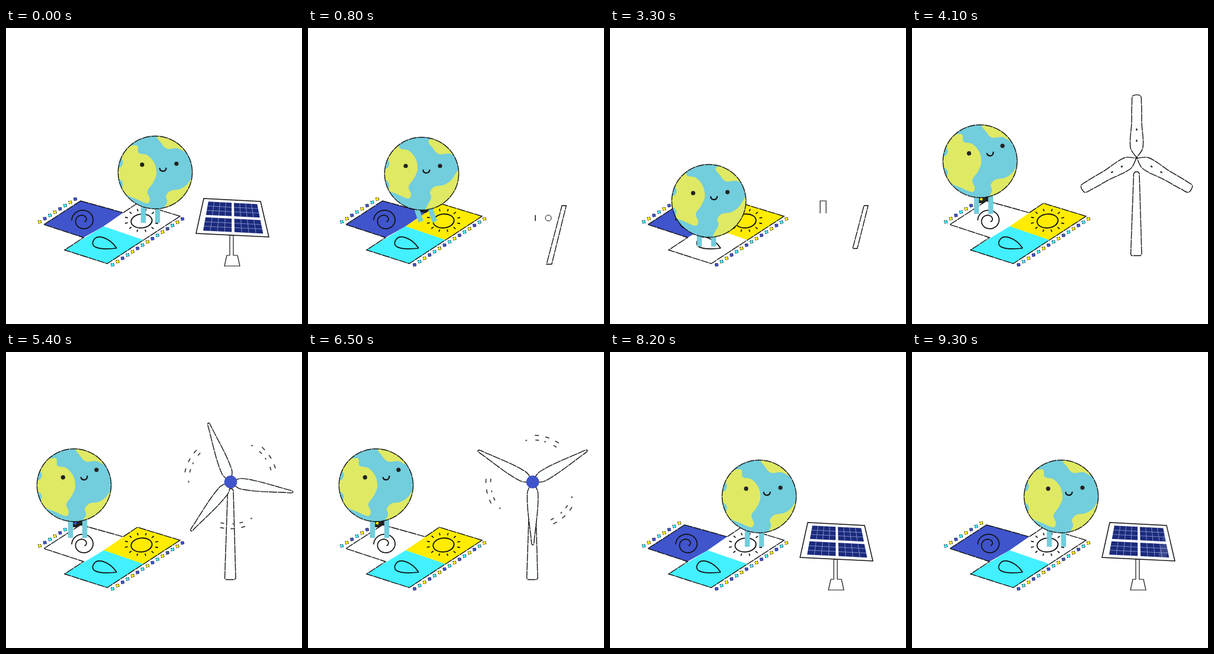
Recreate the animation shown at these times as an HTML page with a canvas. Size 500 by 500 pixels, loop 9400 ms.

```html
<!DOCTYPE html>
<html lang="en">
<head>
<meta charset="utf-8">
<title>Earth and clean energy</title>
<style>
html, body { margin: 0; width: 100%; height: 100%; overflow: hidden; background: #fff; }
canvas { display: block; width: 500px; height: 500px; }
</style>
</head>
<body>
<canvas id="stage" width="500" height="500"></canvas>
<script>
const ctx = document.getElementById('stage').getContext('2d');
const LOOP = 9400, INK = '#111', SEA = '#72cddc', LAND = '#dfe964', PAPER = '#fdfefe';
const YELLOW = '#ffec00', CYAN = '#42f0ff', BLUE = '#4054cc', WHITE = '#ffffff';

const clamp = v => Math.max(0, Math.min(1, v));
const ramp = (t, from, to) => { const p = clamp((t - from) / (to - from)); return p * p * (3 - 2 * p); };
const mix = (a, b, p) => a + (b - a) * p;
const mixPoint = (a, b, p) => [mix(a[0], b[0], p), mix(a[1], b[1], p)];
const during = (t, on, off, fade = 200) => ramp(t, on, on + fade) - ramp(t, off, off + fade);

function tint(from, to, p) {
  const part = (c, i) => parseInt(c.slice(i, i + 2), 16);
  return `rgb(${[1, 3, 5].map(i => Math.round(mix(part(from, i), part(to, i), p)))})`;
}
function paint(fill, stroke, width = 1, dash = []) {
  if (fill) { ctx.fillStyle = fill; ctx.fill(); }
  if (!stroke) return;
  ctx.strokeStyle = stroke;
  ctx.lineWidth = width;
  ctx.setLineDash(dash);
  ctx.stroke();
  ctx.setLineDash([]);
}
const outline = fill => paint(fill, INK, 1.4, [14, 1]);
function poly(...points) {
  ctx.beginPath();
  points.forEach(p => ctx.lineTo(...p));
  ctx.closePath();
}
// Closed curve through all points
function smooth(points) {
  const n = points.length, at = i => points[(i + n) % n];
  ctx.beginPath();
  ctx.moveTo(...at(0));
  for (let i = 0; i < n; i++) {
    const lean = (k, s) => [0, 1].map(c => at(k)[c] + s * (at(k + 1)[c] - at(k - 1)[c]) / 6);
    ctx.bezierCurveTo(...lean(i, 1), ...lean(i + 1, -1), ...at(i + 1));
  }
}
function line(a, b) { ctx.beginPath(); ctx.moveTo(...a); ctx.lineTo(...b); }
function bend(a, b, c) { ctx.beginPath(); ctx.moveTo(...a); ctx.quadraticCurveTo(...b, ...c); }
function oval(x, y, rx, ry = rx, tilt = 0) { ctx.beginPath(); ctx.ellipse(x, y, rx, ry, tilt, 0, 7); }
function group(draw) { ctx.save(); draw(); ctx.restore(); }

// Mat

function fringe(from, to, count, shift) {
  for (let i = 0; i < count; i++) {
    oval(...mixPoint(from, to, i / (count - 1)), 2.8);
    paint([YELLOW, BLUE, CYAN][(i + shift) % 3], '#223', 1.1, [2.5, 2]);
  }
}
function drawSpiral() {
  ctx.beginPath();
  for (let p = 0; p <= 1; p += .02) {
    const r = 19 * (1 - .85 * p ** 1.8), a = Math.PI * (1 + 3.3 * p);
    ctx.lineTo(130 + r * Math.cos(a), 325 + r * .93 * Math.sin(a));
  }
  paint(null, INK, 1.7);
}
function drawSun() {
  oval(229, 326, 17.7, 11.7, -.1);
  paint(null, INK, 1.9);
  for (let i = 0; i < 12; i++) {
    const a = i * Math.PI / 6 - .25, c = Math.cos(a), s = Math.sin(a);
    line([229 + 24 * c, 325 + 16 * s], [229 + 29 * c, 325 + 20 * s]);
    paint(null, INK, 1.7);
  }
}
function drawDrop() {
  ctx.beginPath();
  ctx.moveTo(187, 372);
  ctx.bezierCurveTo(174, 353, 155, 349, 149, 357);
  ctx.bezierCurveTo(141, 368, 151, 376, 187, 372);
  paint(null, INK, 1.7);
}
function drawMat(t) {
  const windTop = [126, 292], windSide = [64, 332], windEnd = [131, 354], notch = [198, 312];
  const sunTop = [222, 296], sunSide = [294, 318], middle = [165, 335], edge = [232, 358];
  const waterEnd = [171, 398], waterSide = [99, 375];
  const tile = (color, lit, ...corners) => { poly(...corners); paint(tint(color, WHITE, lit)); };
  tile(BLUE, during(t, 3900, 6850), windTop, notch, middle, windEnd, windSide);
  tile(YELLOW, 1 - during(t, 500, 7200), sunTop, sunSide, edge, middle);
  tile(CYAN, during(t, 1000, 3400), middle, edge, waterEnd, waterSide);
  poly(windTop, notch, sunTop, sunSide, waterEnd, waterSide, windEnd, windSide);
  outline();
  drawSpiral();
  drawSun();
  drawDrop();
  const shift = t % 1700 >= 700 ? 2 : 0;
  fringe([57, 327.5], [117, 289], 8, shift);
  fringe([180, 400], [298, 322.5], 15, shift + 2);
}

// Earth: place, turn of the map, face tilt, and how the legs stand

const POSES = {
  sun: { x: 252, y: 244, turn: 0, tilt: -.03, hip: -8, slant: 0, foot: 85, kick: 0 },
  hop: { x: 192, y: 246, turn: 1, tilt: 0, hip: 1, slant: 10, foot: 81, kick: 0 },
  water: { x: 167, y: 292, turn: 1, tilt: -.03, hip: -4, slant: 0, foot: 77, kick: 0 },
  wind: { x: 115, y: 225, turn: 0, tilt: -.22, hip: 6, slant: 0, foot: 89, kick: 0 },
  land: { x: 226, y: 216, turn: 0, tilt: -.16, hip: 0, slant: 3, foot: 104, kick: 1 }
};
// Time, pose, height of the arc that leads there
const MOVES = [[0, 'sun', 0], [500, 'sun', 0], [800, 'hop', 0], [1150, 'water', 0], [3300, 'water', 0],
  [4080, 'wind', 30], [6800, 'wind', 0], [7300, 'land', 35], [7750, 'sun', 0], [LOOP, 'sun', 0]];

// Coast points, and how far each land drifts when the map turns
const LANDS = [
  { drift: [-9, -10], coast: [[-34, -46], [-28, -33], [-13, -29], [-1, -15], [2, 3], [-4, 18], [-13, 32], [-9, 45],
    [-14, 52], [-34, 44], [-49, 37], [-66, 18], [-80, -30]] },
  { drift: [9, 7], coast: [[4, -64], [10, -50], [20, -40], [37, -41], [54, -36], [40, -75]] },
  { drift: [-4, -9], coast: [[70, 4], [54, 20], [42, 28], [26, 31], [18, 40], [20, 50], [14, 75], [75, 75]] }
];

function poseAt(t) {
  const i = MOVES.findIndex(m => m[0] > t);
  const [start, from] = MOVES[i - 1], [end, to, arc] = MOVES[i];
  const p = ramp(t, start, end), pose = {};
  for (const key in POSES.sun) pose[key] = mix(POSES[from][key], POSES[to][key], p);
  pose.y -= arc * 4 * p * (1 - p);
  return pose;
}
function drawGap({ x, y, hip, slant, kick }) {
  if (kick > .3) return;
  poly([x + hip - 12, y + 55], [x + hip + 16, y + 55], [x + hip + 16, y + 71], [x + hip - 10 + slant / 2, y + 71]);
  paint('#222');
}
function drawLegs({ hip, slant, foot, kick }) {
  const left = hip - 12, right = hip + 12;
  const heel = mixPoint([left + slant, foot], [-80, 42], kick);
  bend([left - 12 * kick, 50], mixPoint([left + slant / 2, 68], [-55, 65], kick), heel);
  paint(null, SEA, 8.5);
  bend([right, 50], [right + slant / 2 + 12 * kick, 74], [right + slant, foot]);
  paint(null, SEA, 8.5);
  if (kick < .6) return;
  const [x, y] = heel;
  bend([x - 49, y + 13], [x - 28, y + 1], [x - 5, y]);
  paint(null, '#444', 2.6, [6, 5, 13, 3]);
  paint(null, WHITE, 1);
}
function drawFace({ turn, tilt }, t) {
  ctx.translate(6.5 - 4.5 * turn - 14 * tilt, -13 + 30 * tilt);
  ctx.rotate(tilt);
  ctx.lineCap = 'round';
  const blink = [2050, 4650, 8450].some(b => t >= b && t < b + 150);
  for (const x of [-29, 29]) {
    if (blink) { line([x - 2.5, .7], [x + 2.5, -.7]); paint(null, INK, 1.8); }
    else { oval(x, 0, 3.6); paint('#222'); }
  }
  ctx.beginPath();
  ctx.arc(6, 6.5, 5.5, .1, Math.PI - .1);
  paint(null, INK, 2.2);
}
function drawEarth(pose, t) {
  const globe = () => oval(0, 0, 62.7, 61.5);
  group(() => {
    ctx.translate(pose.x, pose.y);
    drawLegs(pose);
    group(() => {
      globe();
      paint(SEA);
      ctx.clip();
      for (const { drift, coast } of LANDS) {
        smooth(coast.map(([x, y]) => [x + drift[0] * pose.turn, y + drift[1] * pose.turn]));
        paint(LAND);
      }
      for (const y of [-17, 20]) { oval(-62, y, 7.5, 9); paint(SEA); }
    });
    globe();
    outline();
    drawFace(pose, t);
  });
}

// Solar panel

function drawPanel(t) {
  const grow = t < 4000 ? 1 - ramp(t, 200, 550) : 1.13 * ramp(t, 7030, 7520) - .13 * ramp(t, 7520, 7720);
  if (grow <= 0) return;
  group(() => {
    ctx.translate(382, 402);
    ctx.scale(Math.min(1, grow * 2), Math.min(1, grow * 2));
    poly([-4, -52], [2, -52], [2, -18], [9, -18], [13, 0], [-13, 0], [-9, -18], [-4, -18]);
    paint(PAPER, INK, 1.2);
  });
  const board = [[334, 288], [430, 293], [444, 353], [321, 347]];
  const at = (u, v) => mixPoint(mixPoint(board[0], board[1], u), mixPoint(board[3], board[2], u), v);
  const grid = (a, b) => { line(a, b); paint(null, '#8796cf', .9); };
  group(() => {
    ctx.translate(382, 0);
    ctx.scale(grow, 1);
    ctx.translate(-382, 0);
    poly(...board);
    paint(PAPER, INK, 1.5);
    for (const u of [.09, .53]) for (const v of [.08, .53]) {
      const w = .4, h = .38;
      poly(at(u, v), at(u + w, v), at(u + w, v + h), at(u, v + h));
      paint('#1b2a7c');
      for (let i = 1; i < 4; i++) grid(at(u + w * i / 4, v), at(u + w * i / 4, v + h));
      for (let i = 1; i < 3; i++) grid(at(u, v + h * i / 3), at(u + w, v + h * i / 3));
    }
    poly(...board);
    ctx.clip();
    line([297 + t % 1400 * .157, 285], [279 + t % 1400 * .157, 355]);
    paint(null, 'rgba(255,255,255,.13)', 14);
  });
}

// Dam

function drawWater(t) {
  ctx.beginPath();
  ctx.moveTo(312, 399);
  ctx.lineTo(333, 330);
  for (let x = 341; x <= 426; x += 2) ctx.lineTo(x, 317 + 3 * Math.cos((x - 360) / 12 * Math.PI));
  ctx.lineTo(403, 399);
  paint(SEA);
  ctx.clip();
  ctx.lineCap = 'round';
  for (const x of [360, 384, 406]) for (let k = 0; k < 3; k++) {
    bend([x - 2 + k * 6, 321], [x - 10 + k * 5, 321], [x - 15 + k * 6, 337 + k * 3]);
    paint(null, WHITE, 1.5);
  }
  for (let i = 0; i < 13; i++) {
    const fall = (i * 37 + t * .06 + 12) % 62, x = 336 + i * 6.2 - fall * .23, y = 334 + fall;
    line([x, y], [x - 2.5, y + 10 + i % 3 * 4]);
    paint(null, WHITE, 1.6);
  }
}
function drawPipe(t, x, delay) {
  const late = t - delay;
  const show = ramp(late, 650, 760) * (1 - ramp(late, 2950, 3100));
  if (!show) return;
  const top = mix(316, 292, ramp(late, 800, 1000)), lip = Math.min(top + 21, 326);
  ctx.beginPath();
  ctx.roundRect(x - 5 * show, top, 10 * show, 326 - top, top > 305 ? 5 : 2);
  paint(PAPER, top > 300 ? INK : null);
  if (top > 300) return;
  ctx.beginPath();
  for (const p of [[x - 5, lip], [x - 5, top], [x + 5, top], [x + 5, lip]]) ctx.lineTo(...p);
  paint(null, INK, 1.2);
}
function drawDam(t) {
  if (t < 600 || t > 3400) return;
  const leaving = ramp(t, 2950, 3300);
  const wall = ramp(t, 780, 1020) * (1 - leaving);
  const rise = ramp(t, 620, 800) * (1 - ramp(t, 3250, 3400));
  const open = ramp(t, 950, 1350) * (1 - leaving);
  const foot = mix(300, 399, rise);
  if (open > 0) group(() => {
    poly([mix(430, 328, open), 300], [430, 300], [403, 399], [mix(403, 293, open), 399]);
    outline('#a9abab');
    ctx.clip();
    ctx.beginPath();
    ctx.rect(290, 300, 150, 100 * ramp(t, 1250, 1650));
    ctx.clip();
    drawWater(t);
  });
  poly([429, 300], [mix(436, 444, wall), 300], [mix(mix(436, 411, rise), 443, wall), foot], [mix(429, 403, rise), foot]);
  outline(PAPER);
  [406, 384, 360].forEach((x, i) => drawPipe(t, x, i * 150));
}

// Wind turbine

function drawBlade(shape) {
  const half = s => mix(5, .6, shape) * s + 8 * Math.sin(Math.PI * Math.sqrt(s)) + (1 - shape) * Math.sin(9 * s);
  const side = sign => Array.from({ length: 9 }, (_, i) => [sign * (half(i / 8) + 1), -2 - 103 * i / 8]);
  smooth([...side(-1), ...side(1).reverse()]);
  outline(PAPER);
  if (shape < 1) for (const y of [-29, -48]) { oval(0, y, 1.4, 2); paint('#333'); }
}
function drawBreeze() {
  for (const [radius, from, to, dash] of [[71, 1.22, .42, [3, 14, 6, 9]], [79, 1, .45, [7, 11]]]) {
    ctx.beginPath();
    ctx.arc(0, 0, radius, -Math.PI / 2 - from, -Math.PI / 2 - to);
    paint(null, '#444', 1.8, dash);
  }
}
function drawTurbine(t) {
  const size = ramp(t, 3450, 4000) * (1 - ramp(t, 6700, 7030));
  if (size <= 0) return;
  const shape = ramp(t, 4120, 4300), spin = Math.max(0, t - 4200) * .1825 * Math.PI / 180;
  const top = mix(384, mix(243, 231, shape), size);
  poly([374.5, top + 3], [377, top], [382, top], [384, top + 3], [388, 382], [386, 384.5], [371, 384.5], [369.5, 382]);
  outline(PAPER);
  group(() => {
    ctx.translate(379.5, 219.5);
    ctx.scale(size, size);
    for (let i = 0; i < 3; i++) group(() => {
      ctx.rotate(spin + i * Math.PI * 2 / 3);
      drawBlade(shape);
      if (shape === 1 && t < 6600) drawBreeze();
    });
    if (shape > 0) { oval(0, 0, 10.5 * shape); paint(BLUE, '#3345a8', .8); }
  });
}

function frame(now) {
  const t = now % LOOP, pose = poseAt(t);
  ctx.fillStyle = WHITE;
  ctx.fillRect(0, 0, 500, 500);
  drawGap(pose);
  drawMat(t);
  drawPanel(t);
  drawDam(t);
  drawTurbine(t);
  drawEarth(pose, t);
  requestAnimationFrame(frame);
}
requestAnimationFrame(frame);
</script>
</body>
</html>
```
